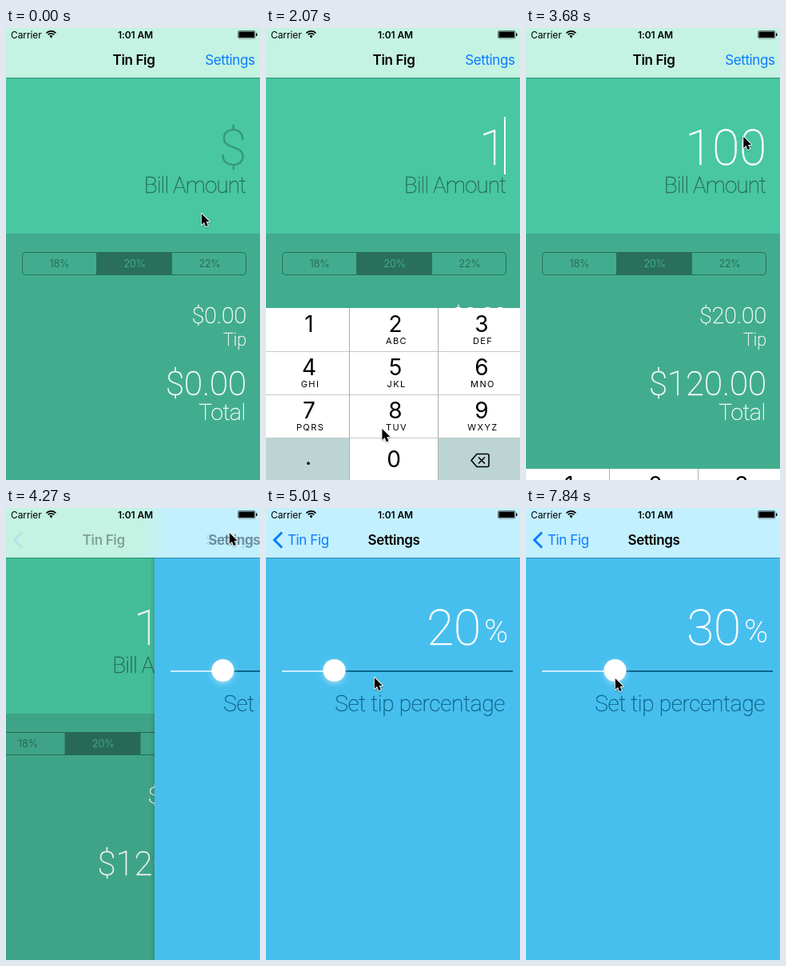
These frames come from a looping animation (318 px wide and 565 px high, 7990 ms). An HTML page with a canvas:

```html
<!DOCTYPE html>
<html lang="en">
<head>
<meta charset="utf-8">
<title>Tip calculator</title>
<style>
html, body { margin: 0; width: 100%; height: 100%; overflow: hidden; background: #48c7a1; }
canvas { display: block; width: 318px; height: 565px; }
</style>
</head>
<body>
<canvas id="stage"></canvas>
<script>
const W = 318, H = 565, LOOP = 7990, TICK = 147.2;
const APP = 'Tin Fig';
const UI = 'Inter, "Open Sans", sans-serif';
const THIN = 'Roboto, Inter, sans-serif';
const GREEN = '#48c7a1', LOWER = '#42ad8e', DARK = '#296f5b';
const SKY = '#47bfee', LINK = '#087cff', NAVY = '#0c668c';

const canvas = document.getElementById('stage');
const ctx = canvas.getContext('2d');
const dpr = window.devicePixelRatio || 1;
canvas.width = W * dpr;
canvas.height = H * dpr;

// Pointer moves, in ticks.
const MOVES = [
  { from: 1, to: 4, x: 276, y: 128 },
  { from: 5, to: 7, x: 265, y: 244 },
  { from: 7, to: 10, x: 78, y: 380 },
  { from: 12, to: 15, x: 168, y: 542 },
  { from: 19, to: 23, x: 264, y: 240 },
  { from: 24, to: 26, x: 279, y: 30 },
  { from: 31, to: 34, x: 135, y: 211 },
  { from: 34, to: 36, x: 90, y: 212 }
];

const ramp = (n, a, b) => Math.min(1, Math.max(0, (n - a) / (b - a)));
const smooth = p => p * p * (3 - 2 * p);

// Critically damped spring from 0 to 1.
function settle(n, start, rate) {
  const x = Math.max(0, n - start) * rate;
  const p = 1 - (1 + x) * Math.exp(-x);
  return p > 0.99 ? 1 : p;
}

const percentAt = n => 20 + 2 * ramp(n, 38, 39) + 6 * ramp(n, 41, 48) + 2 * ramp(n, 50, 53);
const knobAt = n => 85.5 + (percentAt(n) - 20) * 2.6;
const keysAt = n => settle(n, 5.3, 2.6) - settle(n, 23.3, 2.6);
const pushAt = n => settle(n, 28.3, 2.03);

function cursorAt(n) {
  let x = 244, y = 231;
  for (const m of MOVES) {
    const p = smooth(ramp(n, m.from, m.to));
    x += (m.x - x) * p;
    y += (m.y - y) * p;
  }
  return n < 39 ? [x, y] : [knobAt(n) - 0.5, y];
}

function rect(x, y, w, h, color) {
  ctx.fillStyle = color;
  ctx.fillRect(x, y, w, h);
}

function line(points, color, width) {
  ctx.beginPath();
  points.forEach(([x, y]) => ctx.lineTo(x, y));
  ctx.strokeStyle = color;
  ctx.lineWidth = width;
  ctx.stroke();
}

function label(str, x, y, size, color, { align = 'center', weight = 400, family = UI, gap = 0 } = {}) {
  ctx.font = `${weight} ${size}px ${family}`;
  ctx.letterSpacing = gap + 'px';
  ctx.textAlign = align;
  ctx.fillStyle = color;
  ctx.fillText(str, x, y);
}

// Hairline face with a slight outline for weight.
function thin(str, x, y, size, color, gap = 0) {
  label(str, x, y, size, color, { align: 'right', weight: 100, family: THIN, gap });
  ctx.strokeStyle = color;
  ctx.lineWidth = 0.25 + size * 0.006;
  ctx.lineJoin = 'round';
  ctx.strokeText(str, x, y);
}

function faded(alpha, draw) {
  if (alpha <= 0) return;
  ctx.save();
  ctx.globalAlpha = Math.min(1, alpha);
  draw();
  ctx.restore();
}

function drawSegments() {
  rect(113, 280, 95, 29, DARK);
  ctx.beginPath();
  ctx.roundRect(20.5, 280.5, 280, 28, 4);
  ctx.strokeStyle = DARK;
  ctx.lineWidth = 1;
  ctx.stroke();
  for (let i = 0; i < 3; i++) {
    label(18 + 2 * i + '%', 67 + i * 94, 299, 13, i === 1 ? LOWER : DARK, { gap: -0.4 });
  }
}

function drawBill(n, push) {
  const digits = [12, 16, 18].filter(t => n >= t).length;
  const bill = '100'.slice(0, digits);
  const money = v => '$' + v.toFixed(2);
  ctx.save();
  ctx.translate(-95 * push, 0);
  rect(0, 62, W + 95, 195, GREEN);
  rect(0, 257, W + 95, 308, LOWER);
  thin(bill || '$', 301, 171, 62, bill ? '#fff' : '#35967a');
  thin('Bill Amount', 300, 206, 28, '#286d59', -0.95);
  drawSegments();
  thin(money(bill * 0.2), 301, 369, 28.4, '#fff');
  thin('Tip', 301, 397, 21.5, '#fff');
  thin(money(bill * 1.2), 301, 459, 42, '#fff');
  thin('Total', 300, 490, 28, '#fff', -0.3);
  const focused = n >= 6 && n < 23;
  if (focused && (n - 6) % 7 < 4) rect(298, 111, 2, 72, '#fff');
  ctx.restore();
}

function drawBackspace(x, y) {
  ctx.save();
  ctx.translate(x, y);
  ctx.lineJoin = 'round';
  ctx.beginPath();
  ctx.moveTo(-11, 0);
  ctx.lineTo(-4, -8);
  ctx.arcTo(11, -8, 11, 0, 2);
  ctx.arcTo(11, 8, 0, 8, 2);
  ctx.lineTo(-4, 8);
  ctx.closePath();
  ctx.strokeStyle = '#000';
  ctx.lineWidth = 1.6;
  ctx.stroke();
  for (const s of [-1, 1]) line([[-2, -4 * s], [6, 4 * s]], '#000', 1.6);
  ctx.restore();
}

function drawKeys(shown) {
  if (shown <= 0) return;
  const letters = ['', 'ABC', 'DEF', 'GHI', 'JKL', 'MNO', 'PQRS', 'TUV', 'WXYZ'];
  ctx.save();
  ctx.translate(0, Math.round(H - 215 * shown));
  rect(0, 0, W, 216, '#fff');
  rect(0, 162, 104, 54, '#bcd4d4');
  rect(216, 162, 102, 54, '#bcd4d4');
  [54, 108, 162].forEach(y => rect(0, y, W, 1, '#c3c9ca'));
  [104, 215].forEach(x => rect(x, 0, 1, 216, '#a9b0b1'));
  letters.forEach((s, i) => {
    const x = 54 + (i % 3) * 108, y = Math.floor(i / 3) * 54;
    label(i + 1, x, y + 30, 28, '#000');
    label(s, x + 1.5, y + 45, 11, '#000', { gap: 1.4 });
  });
  label('.', 53, 196, 28, '#000');
  label('0', 160, 199, 28, '#000');
  drawBackspace(268, 190.5);
  ctx.restore();
}

function drawSettings(n, push) {
  if (push <= 0) return;
  const knob = knobAt(n);
  const left = Math.round(W * (1 - push));
  if (push < 1) {
    rect(0, 62, left, H, `rgba(0,0,0,${0.12 * push})`);
    const shade = ctx.createLinearGradient(left - 6, 0, left, 0);
    shade.addColorStop(0, 'rgba(0,0,0,0)');
    shade.addColorStop(1, 'rgba(0,0,0,.12)');
    rect(left - 6, 62, 6, H, shade);
  }
  ctx.save();
  ctx.translate(left, 0);
  rect(0, 62, W, H, SKY);
  thin(Math.round(percentAt(n)), 269, 171, 62, '#fff');
  thin('%', 303, 168, 40, '#fff');
  rect(20, 203, knob - 20, 2, '#c9edfb');
  rect(knob, 203, 309 - knob, 2, NAVY);
  ctx.save();
  ctx.shadowColor = 'rgba(255,255,255,.45)';
  ctx.shadowBlur = 6 * dpr;
  ctx.shadowOffsetY = 2.5 * dpr;
  ctx.beginPath();
  ctx.arc(knob, 203, 14, 0, Math.PI * 2);
  ctx.fillStyle = '#fff';
  ctx.fill();
  ctx.restore();
  thin('Set tip percentage', 299, 254, 28, '#0d6288', -0.3);
  ctx.restore();
}

function drawWifi(x, y) {
  const fan = r => ctx.arc(x, y, r, -Math.PI * 0.76, -Math.PI * 0.24);
  ctx.strokeStyle = ctx.fillStyle = '#000';
  ctx.lineWidth = 1.7;
  for (const r of [8.2, 5.2]) {
    ctx.beginPath();
    fan(r);
    ctx.stroke();
  }
  ctx.beginPath();
  ctx.moveTo(x, y + 0.8);
  fan(2.8);
  ctx.fill();
}

function drawStatus() {
  label('Carrier', 6, 13, 12, '#000', { align: 'left', gap: -0.1 });
  label('1:01 AM', 162, 13, 12, '#000', { weight: 600, gap: -0.1 });
  drawWifi(56.5, 12);
  ctx.beginPath();
  ctx.roundRect(290.5, 3.5, 21.5, 9.5, 1.8);
  ctx.lineWidth = 0.5;
  ctx.stroke();
  rect(291.5, 4.5, 19.5, 7.5, '#000');
  rect(313, 6.5, 1.4, 3.5, '#000');
}

function drawNav(push) {
  const edge = W * (1 - push);
  const bar = ctx.createLinearGradient(edge - 22, 0, edge + 22, 0);
  bar.addColorStop(0, '#c4f2e3');
  bar.addColorStop(1, '#c3f0ff');
  rect(0, 0, W, 62, push <= 0 ? '#c4f2e3' : push >= 1 ? '#c3f0ff' : bar);
  rect(0, 62, W, 1, 'rgba(0,0,0,.25)');
  const bold = { weight: 600, gap: -0.35 };
  faded(1 - push * 1.6, () => label(APP, 160 - 91 * push, 46, 17, '#000', bold));
  faded(1 - push * 2, () => label('Settings', 311.5, 46, 17, LINK, { align: 'right', gap: -0.4 }));
  faded(push, () => label('Settings', 160 + 215 * (1 - push), 46, 17, '#000', bold));
  faded((push - 0.35) * 1.6, () => {
    ctx.lineJoin = 'miter';
    line([[20, 30.5], [10.5, 40], [20, 49.5]], LINK, 3);
  });
  faded((push - 0.5) * 2.1, () =>
    label(APP, 27 + 80 * (1 - push), 46, 17, LINK, { align: 'left', gap: -0.4 }));
  drawStatus();
}

function drawCursor(x, y) {
  ctx.save();
  ctx.translate(x, y);
  ctx.shadowColor = 'rgba(0,0,0,.3)';
  ctx.shadowBlur = 2 * dpr;
  ctx.shadowOffsetY = dpr;
  ctx.beginPath();
  [[0.8, 1], [0.8, 15], [4, 12], [6.2, 17.2], [8.8, 16.1], [6.6, 11], [10.8, 11]]
    .forEach(([px, py]) => ctx.lineTo(px, py));
  ctx.closePath();
  ctx.lineJoin = 'round';
  ctx.strokeStyle = '#fff';
  ctx.lineWidth = 1.8;
  ctx.stroke();
  ctx.shadowColor = 'transparent';
  ctx.fillStyle = '#000';
  ctx.fill();
  ctx.restore();
}

function draw(ms) {
  // The picture advances in even ticks.
  const n = Math.min(53, Math.floor((ms % LOOP + 12) / TICK));
  const push = pushAt(n);
  ctx.setTransform(dpr, 0, 0, dpr, 0, 0);
  drawBill(n, push);
  drawKeys(keysAt(n));
  drawSettings(n, push);
  drawNav(push);
  drawCursor(...cursorAt(n));
}

const start = performance.now();
function frame() {
  draw(performance.now() - start);
  requestAnimationFrame(frame);
}
frame();
</script>
</body>
</html>
```
